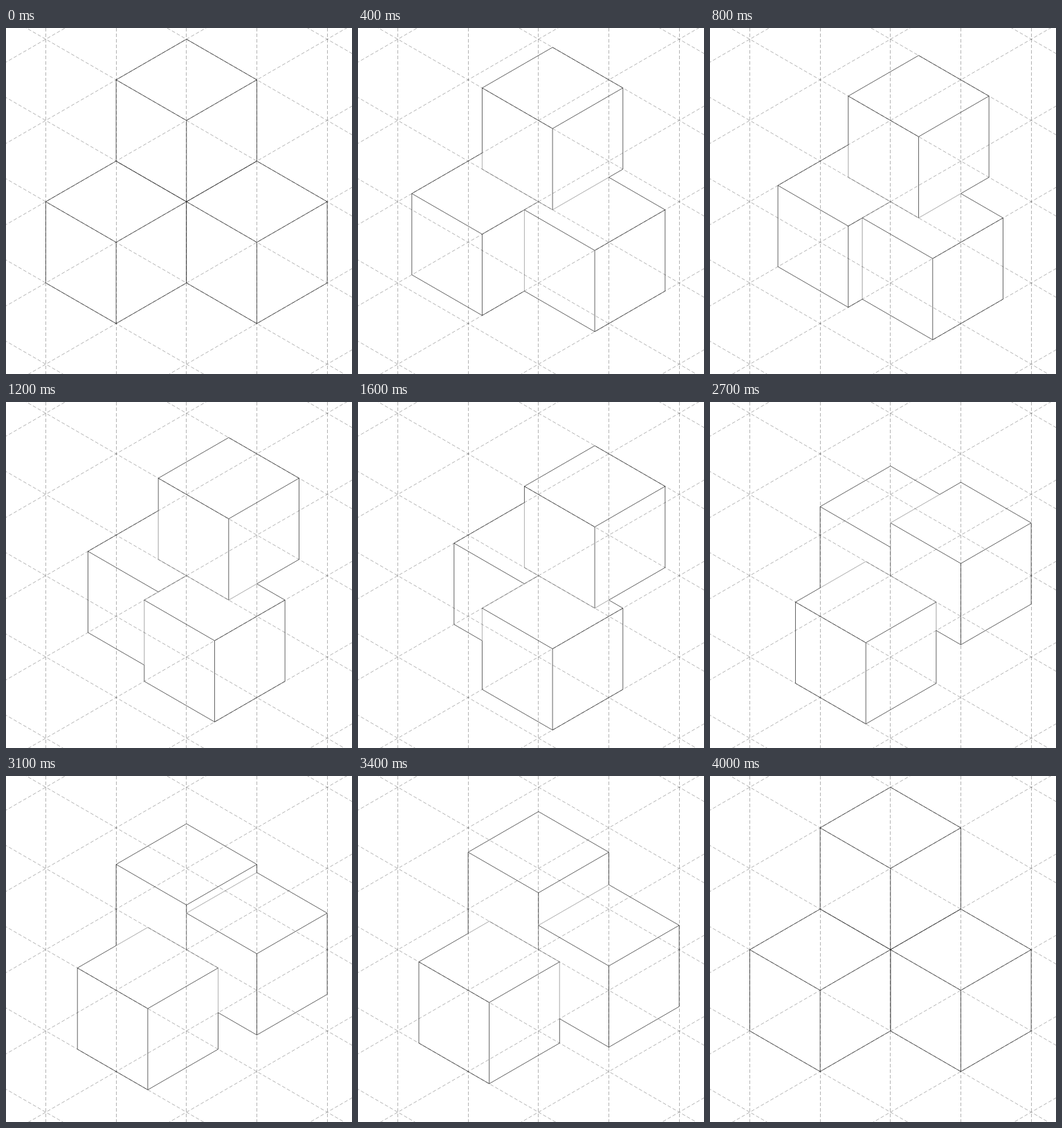
An HTML page with a canvas that plays this animation: 500 by 500 pixels, repeating every 4.1 s.

```html
<!DOCTYPE html>
<html>
<head>
<meta charset="utf-8">
<style>
html, body { margin: 0; width: 100%; height: 100%; overflow: hidden; background: #fff; }
canvas { display: block; }
</style>
</head>
<body>
<canvas id="stage" width="500" height="500"></canvas>
<script>
const ctx = document.getElementById('stage').getContext('2d');
const EDGE = 117.4, HALF = EDGE * Math.sqrt(3) / 2;
const STEP = 100, STEPS = 40;
const INK = '#111', INK_WIDTH = .65;

// Isometric units: x counts half-widths, y counts edge lengths.
const toX = x => 260.8 + x * HALF;
const toY = y => 251 + y * EDGE;

// Front corner of each cube at the start, middle and end of the loop.
const back = [[-1, .5], [0, 0], [0, -1]];
const upper = [[0, -1], [1, -.5], [1, .5]];
const lower = [[1, .5], [0, 1], [-1, .5]];

const HULL = [[0, -1], [1, -.5], [1, .5], [0, 1], [-1, .5], [-1, -.5]];

function position(track, p) {
  const leg = p < .5 ? 0 : 1, f = p * 2 - leg;
  return track[leg].map((v, i) => v + (track[leg + 1][i] - v) * f);
}

function stroke(path, color, width) {
  ctx.strokeStyle = color;
  ctx.lineWidth = width;
  ctx.stroke(path);
}

function drawCube([x, y], behind, moving) {
  const hull = new Path2D(), inner = new Path2D();
  HULL.forEach(([dx, dy]) => hull.lineTo(toX(x + dx), toY(y + dy)));
  hull.closePath();
  for (const i of [1, 3, 5]) {
    inner.moveTo(toX(x), toY(y));
    inner.lineTo(toX(x + HULL[i][0]), toY(y + HULL[i][1]));
  }
  ctx.fillStyle = '#fff';
  ctx.fill(hull);
  stroke(hull, INK, INK_WIDTH);
  // Outlines crossing another cube are lighter.
  if (moving) {
    ctx.save();
    ctx.clip(behind);
    stroke(hull, 'rgba(255,255,255,.5)', 1.5);
    ctx.restore();
  }
  stroke(inner, INK, INK_WIDTH);
  behind.addPath(hull);
}

function drawGrid() {
  const grid = new Path2D();
  const line = (x1, y1, x2, y2) => {
    grid.moveTo(x1, y1);
    grid.lineTo(x2, y2);
  };
  for (let i = -2; i <= 2; i++) {
    const x = Math.floor(toX(i)) + .5;
    line(x, 0, x, 500);
  }
  for (let i = -4; i <= 4; i++) {
    for (const slope of [-.5, .5]) {
      line(toX(-3), toY(i - 3 * slope), toX(3), toY(i + 3 * slope));
    }
  }
  ctx.save();
  ctx.globalCompositeOperation = 'multiply';
  ctx.setLineDash([5, 3]);
  stroke(grid, '#b4b4b4', 1);
  ctx.restore();
}

function draw(now) {
  const p = Math.floor(now / STEP) % (STEPS + 1) / STEPS;
  const order = p < .5 ? [back, lower, upper] : [back, upper, lower];
  const behind = new Path2D();
  ctx.fillStyle = '#fff';
  ctx.fillRect(0, 0, 500, 500);
  for (const track of order) drawCube(position(track, p), behind, p % 1 > 0);
  drawGrid();
}

const start = performance.now();
function tick() {
  draw(performance.now() - start);
  requestAnimationFrame(tick);
}
tick();
</script>
</body>
</html>
```
